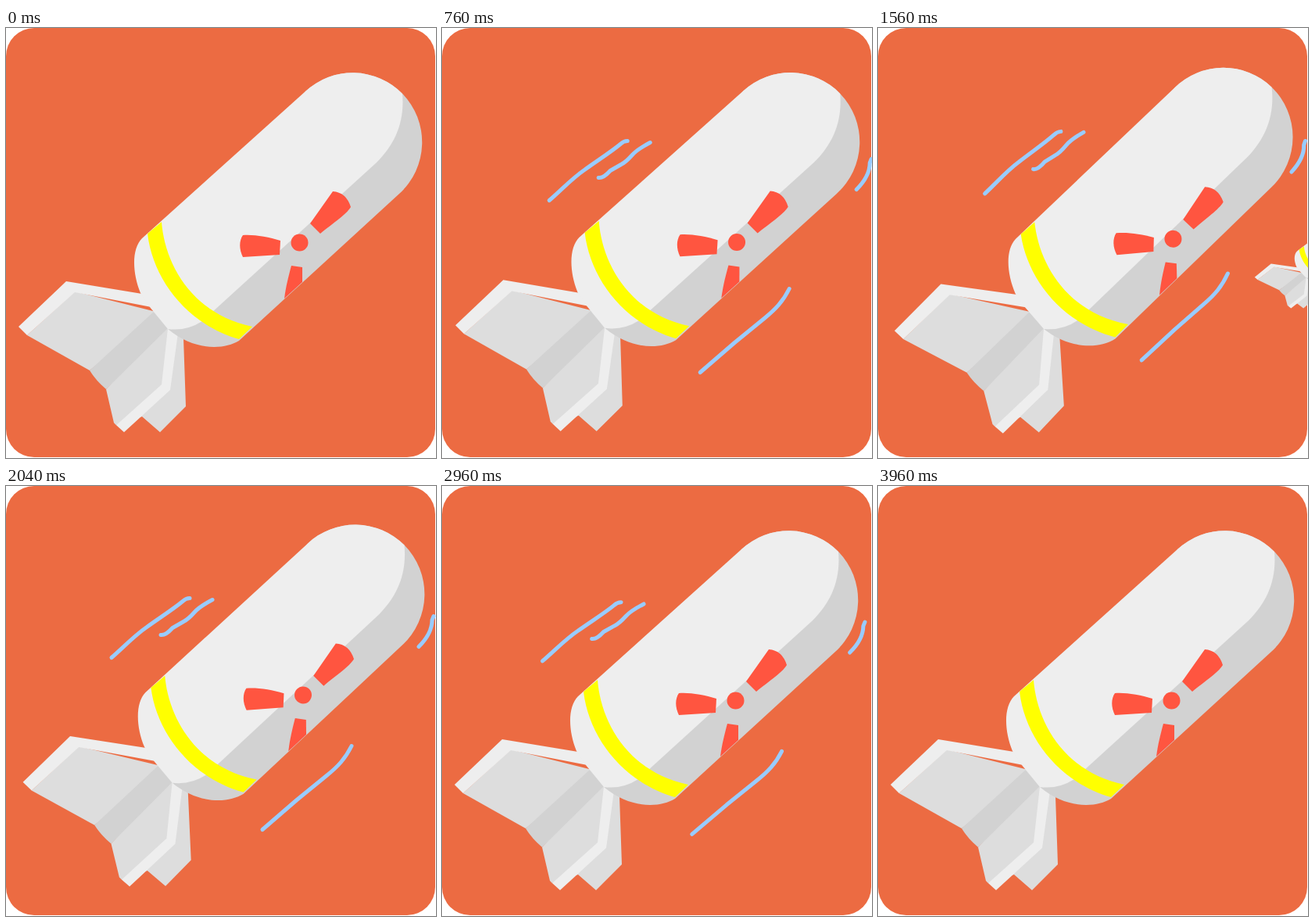
Write an HTML page that moves like this. It is 550x550 px and loops after 4000 ms.

```html
<!DOCTYPE html>
<html lang="en">
<head>
<meta charset="utf-8">
<title>Flying bomb</title>
<style>
  html, body { margin: 0; width: 100%; height: 100%; overflow: hidden; background: #fff; }
  svg { display: block; width: 100vw; height: 100vh; }
</style>
</head>
<body>
<svg viewBox="0 0 550 550">
  <defs>
    <g id="bomb">
      <!-- fins -->
      <path fill="#ddd" d="M88 337L200 365L107 438L27 393Z"/>
      <path fill="#eee" d="M77 324L174 340L186 357L88 338L27 393L16 382Z"/>
      <path fill="#d2d2d2" d="M190 362L215 384L128 462Q115 451 107 438Z"/>
      <path fill="#ddd" d="M207 384L227 397L230 484L197 517L174 497L141 508L138 505L128 462Z"/>
      <path fill="#eee" d="M207 384L220 390L210 463L151 517L141 508L199 456Z"/>
      <!-- body -->
      <path fill="#d2d2d2" d="M383 81A89 89 0 0 1 507 84A89 89 0 0 1 503 212L298 400C278 412 241 413 207 385L230 350Z"/>
      <path fill="#eee" d="M507 84C510 120 498 148 474 172L251 375Q231 388 207 385L184 357L172 339C161 312 161 282 174 269L383 81A89 89 0 0 1 507 84Z"/>
      <path fill="#ff0" d="M199 248C203 302 238 366 315 382L298 398C232 379 188 322 181 263Z"/>
      <!-- hazard sign -->
      <g fill="#ff5540">
        <circle cx="375.5" cy="274.5" r="11"/>
        <path d="M418 209Q435 210 441 229C436 238 415 252 402 263L389 250Z"/>
        <path d="M303 265C298 272 298 283 303 293L350 290L351 272C335 267 317 264 303 265Z"/>
        <path d="M365 304L379 306V325L356 346C358 330 362 315 365 304Z"/>
      </g>
    </g>
  </defs>
  <rect width="549" height="549" rx="36" fill="#ec6b42"/>
  <use id="upper" href="#bomb"/>
  <use id="main" href="#bomb"/>
  <use id="lower" href="#bomb"/>
  <g id="lines" fill="none" stroke="#9cf" stroke-width="5" stroke-linecap="round" stroke-linejoin="round">
    <path d="M138 216C153 203 167 188 183 177C201 164 217 154 229 144Q233 140 238 140"/>
    <path d="M201 187Q207 188 216 178L230 170Q236 167 244 158Q250 151 267 142"/>
    <path d="M531 202C542 191 548 181 548 168L550 163"/>
    <path d="M445 329C437 345 428 355 413 367L375 398L331 436"/>
  </g>
</svg>
<script>
const LOOP = 4000, STEP = 40;
const AXIS = { x: 11, y: -11 };   // reach of one shake along the flight direction

const bombPoses = [
  { t: 0, x: 0, y: 0, turn: 0 },
  { t: 400, x: 2.2, y: -2.5, turn: -.3 },
  { t: 1080, x: -6.5, y: 8, turn: .66 },
  { t: 1560, x: 2, y: -1.9, turn: -1.6 },
  { t: 2040, x: 4.5, y: -6, turn: -.6 },
  { t: 2960, x: 0, y: 0, turn: 0 },
  { t: 3960, x: 0, y: 0, turn: 0 }
];
const linePoses = [
  { t: 400, x: 0, y: 0, turn: 0 },
  { t: 1080, x: -9, y: 16, turn: 0 },
  { t: 1560, x: .6, y: -9, turn: -2 },
  { t: 2040, x: -3, y: 3.5, turn: 0 },
  { t: 2960, x: -10, y: 9, turn: .45 }
];

const [upper, main, lower, lines] =
  ['upper', 'main', 'lower', 'lines'].map(id => document.getElementById(id));

// Glides from pose to pose, shaking along the axis in whole swings between them.
function shake(el, poses, t) {
  const first = poses[0], last = poses[poses.length - 1];
  const time = Math.min(Math.max(t, first.t), last.t);
  const b = poses.find(p => p.t >= time && p !== first);
  const a = poses[poses.indexOf(b) - 1];
  const span = b.t - a.t, u = (time - a.t) / span;
  const swing = Math.sin(2 * Math.PI * Math.round(span / 400) * u);
  const mix = key => a[key] + (b[key] - a[key]) * u;
  const x = mix('x') + AXIS.x * swing, y = mix('y') + AXIS.y * swing;
  el.setAttribute('transform', `translate(${x} ${y}) rotate(${mix('turn')} 275 275)`);
}

function show(el, on) {
  el.style.visibility = on ? 'visible' : 'hidden';
}

// Small bombs cross the stage at a constant speed.
function fly(el, t, from, to, x, y) {
  const n = (t - from) / STEP;
  show(el, t >= from && t < to);
  el.setAttribute('transform', `translate(${x + 26.6 * n} ${y - 21.5 * n}) scale(.345 .295)`);
}

function draw() {
  const t = Math.floor(performance.now() % LOOP / STEP) * STEP;
  shake(main, bombPoses, t);
  shake(lines, linePoses, t);
  show(lines, t >= 200 && t < 3000);
  fly(lower, t, 920, 1720, 50.6, 550);
  fly(upper, t, 2280, 2800, -168, 116);
  requestAnimationFrame(draw);
}
draw();
</script>
</body>
</html>
```
